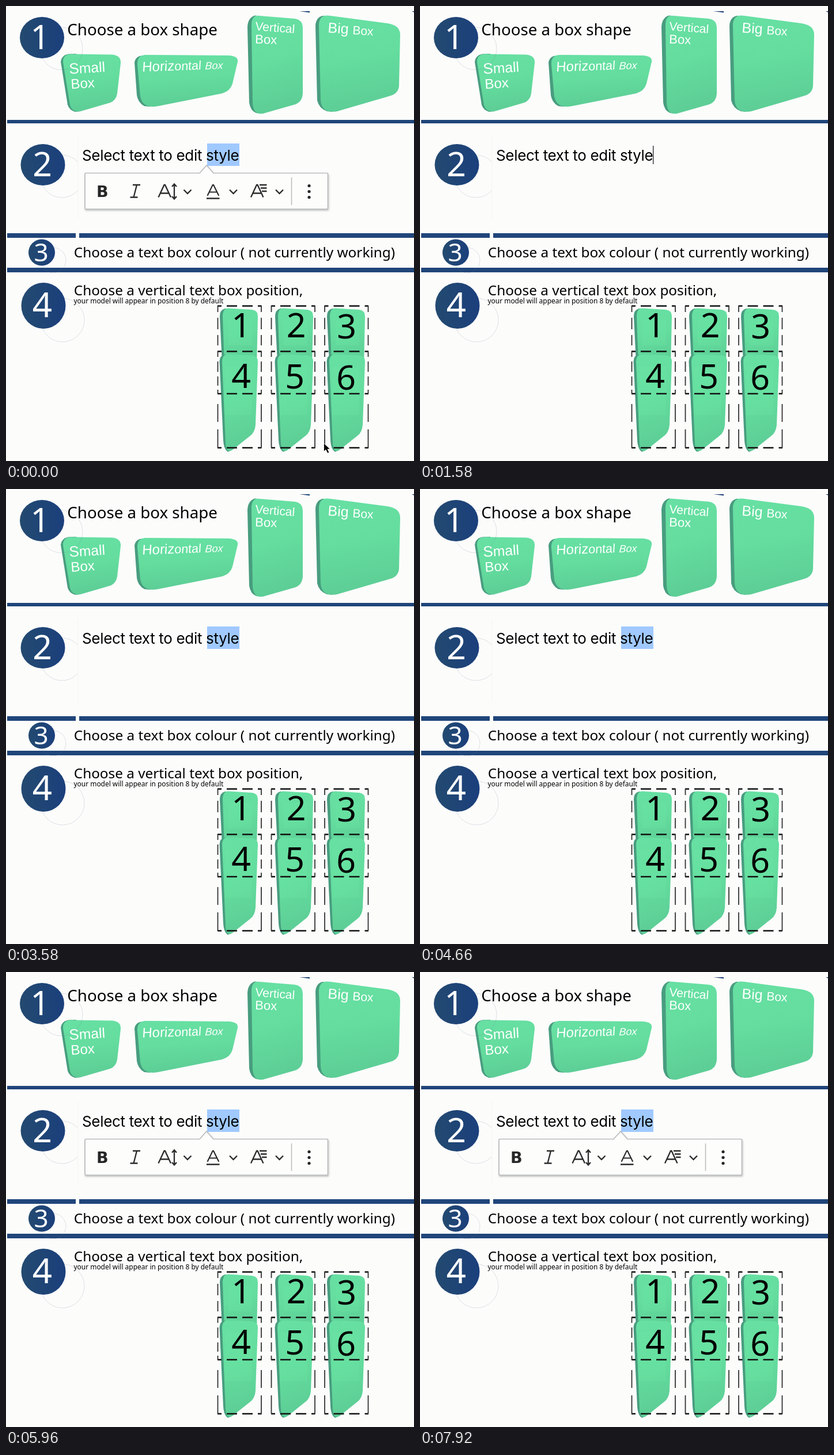
Animation of 708 by 791 pixels, one loop 8000 ms. Source, as an HTML page:

```html
<!DOCTYPE html>
<html lang="en">
<head>
<meta charset="utf-8">
<title>Choose a box</title>
<style>
  html, body { margin: 0; width: 100%; height: 100%; overflow: hidden; background: #fcfcfb; }
  svg { display: block; width: 100vw; height: 100vh; }
  text { font-family: "Noto Sans", sans-serif; }
  .label text { font-family: "Liberation Sans", Arial, sans-serif; fill: #fff; }
  .sample { font: 26px Inter, sans-serif; letter-spacing: -.33px; }
  .bold { font: 700 27px "DejaVu Sans", sans-serif; fill: #262626; }
  .digit { font-size: 59px; text-anchor: middle; }
  .ring { fill: none; stroke: #6f7a90; stroke-opacity: .28; stroke-width: .8; }
  .icon { fill: none; stroke: #2b2b2b; stroke-width: 2.3; }
</style>
</head>
<body>
<svg viewBox="0 0 708 791" preserveAspectRatio="none">
  <defs>
    <linearGradient id="green" x1="0" y1="0" x2=".15" y2="1">
      <stop offset="0" stop-color="#67e0a3"/>
      <stop offset=".5" stop-color="#64dd9e"/>
      <stop offset="1" stop-color="#5dce96"/>
    </linearGradient>
    <linearGradient id="navy">
      <stop offset="0" stop-color="#234a70"/>
      <stop offset="1" stop-color="#1b3f7c"/>
    </linearGradient>
    <filter id="shadow" x="-5%" y="-20%" width="110%" height="150%">
      <feDropShadow dx="1" dy="2" stdDeviation="1.5" flood-opacity=".25"/>
    </filter>
    <clipPath id="leftPart"><path d="M0 200H124V395H0z"/></clipPath>
    <path id="chevron" class="icon" d="M-6.500-3L0 3.500 6.500-3"/>
    <path id="letterA" class="icon" d="M0 21.500L10 0H11.500L21.500 21.500M4 14.500H17.500"/>
  </defs>

  <!-- dividers -->
  <path fill="#20457a" d="M2 198H708V204H2zM2 395H121V403H2zM127 395H708V403H127zM2 455H708V463H2zM509 9H527V11.500zM704 9H708V11z"/>
  <path stroke="#f4f4f0" d="M124.500 225V370"/>

  <!-- sample shapes -->
  <g fill="#489d7f">
    <path d="M95 97Q96 86 108 83.500L122 83 130 183 120 184Q110 181 107 172Z"/>
    <path d="M223 98Q224 90 232 87L245 85 250 175 240 174Q229 168 227 155Z"/>
    <path d="M419 36Q420 20 432 16.500L445 18 444 187 434 186Q424 182 422 168Z"/>
    <path d="M537 34Q538 20 549 17L566 18 566 184 557 183Q543 178 540 164Z"/>
  </g>
  <g fill="url(#green)">
    <path d="M99 98Q98 84 114 83.500L184 84.500Q200 86 199 99L193 152Q191 164 181 168L133 182Q115 187 111 172Z"/>
    <path d="M228 102Q227 86 242 85L386 86Q404 87 402 97L393 135Q389 148 375 152L264 174Q237 179 233 157Z"/>
    <path d="M426 37Q425 14 440 17L501 22Q515 24 515 38V152Q514 167 502 171L446 187Q429 190 428 168Z"/>
    <path d="M543 36Q542 13 563 17L661 30Q684 33 684 50L682 139Q681 153 664 157L575 183Q548 188 546 164Z"/>
  </g>
  <g class="label">
    <g transform="translate(110 118) rotate(-3.500)"><text font-size="26">S<tspan font-size="24.700">mall</tspan></text></g>
    <g transform="translate(113 144) rotate(-4)"><text font-size="24">Box</text></g>
    <g transform="translate(236 114) rotate(-2) skewX(-5)"><text font-size="24">Horiz<tspan font-size="21.500">ontal</tspan> <tspan font-size="18" font-style="italic">Box</tspan></text></g>
    <g transform="translate(432 42) rotate(4.500)"><text font-size="21">Vertical</text></g>
    <g transform="translate(432 65) rotate(2)"><text font-size="22">Box</text></g>
    <g transform="translate(558 46) rotate(4)"><text font-size="25">Big <tspan font-size="21">Box</tspan></text></g>
  </g>

  <g id="steps"></g>

  <!-- instructions -->
  <text x="106.300" y="51" font-size="27.700">Choose a box shape</text>
  <text x="117.800" y="437" font-size="24.370">Choose a text box colour ( not currently working)</text>
  <text x="117.800" y="503" font-size="24.300">Choose a vertical text box position,</text>
  <text x="117.500" y="517" font-size="11.950">your model will appear in position 8 by default</text>

  <!-- text editor -->
  <rect id="selection" y="239" height="39" fill="#a0c9ff"/>
  <text class="sample" x="132" y="269">Select text to edit style</text>
  <path id="caret" stroke="#222" stroke-width="1.300" d="M404.700 243V275"/>
  <g id="toolbar">
    <path filter="url(#shadow)" fill="#fdfdfb" stroke="#b9bbbd" stroke-width="1.700" d="M138 290.500H336L348 277 360 290.500H557Q558.500 290.500 558.500 292V351Q558.500 353 557 353H138.500Q137 353 137 351V292Q137 290.500 138 290.500Z"/>
    <text class="bold" x="157" y="332">B</text>
    <path class="icon" d="M220 311H233M215.500 332.500H228.500M227 311L221.500 332.500M292 310V335M288 314L292 309.500 296 314M288 331L292 335.500 296 331M348 334.500H370.500M440 311H452.500M442 316.500H452.500M444 322H452.500"/>
    <use href="#letterA" x="264.500" y="311"/>
    <use href="#letterA" transform="translate(349.500 311) scale(.92 .87)"/>
    <use href="#letterA" x="425" y="311"/>
    <use href="#chevron" x="315" y="322.500"/>
    <use href="#chevron" x="394.500" y="322.500"/>
    <use href="#chevron" x="474.500" y="322.500"/>
    <path stroke="#b9bbbd" stroke-width="1.500" d="M495.500 298V346"/>
    <g fill="#262626"><circle cx="526" cy="312.500" r="2.600"/><circle cx="526" cy="322.500" r="2.600"/><circle cx="526" cy="332.500" r="2.600"/></g>
  </g>

  <g id="positions"></g>
  <path id="pointer" fill="#000" stroke="#fff" stroke-width=".8" d="M551.500 760V774.500L555 771.500 558 777.500 560.800 776 558 770.500H562.500Z"/>
</svg>
<script>
const $ = id => document.getElementById(id);

// Numbered badges: digit, centre, radii, ring centre and radius, digit position and size
const badge = (n, cx, cy, rx, ry, ringX, ringY, ringR, x, y, size) => `
  <circle class="ring" cx="${ringX}" cy="${ringY}" r="${ringR}" ${n === 2 ? 'clip-path="url(#leftPart)"' : ''}/>
  <ellipse cx="${cx}" cy="${cy}" rx="${rx}" ry="${ry}" fill="url(#navy)"/>
  <text class="digit" x="${x}" y="${y}" style="font-size:${size}px" fill="#fff">${n}</text>`;

$('steps').innerHTML =
  badge(1, 62.5, 55, 38.5, 36, 96, 74, 37, 59, 75, 59) +
  badge(2, 64, 276, 38.5, 36, 97, 296, 37, 63, 296, 59) +
  badge(3, 62, 428.5, 23, 23, 82, 442, 22, 61, 444, 44) +
  badge(4, 65, 521, 38.5, 40, 98, 546, 38, 63, 541, 60);

const column = dx => `<g transform="translate(${dx} 0)">
  <path fill="#489d7f" d="M371 540Q371 528 380 526H390V620H375Z"/>
  <path fill="url(#green)" d="M376 540Q376 525 386 525.500L427 528Q437 529 437 540L435 625H379Z"/>
  <path fill="#489d7f" d="M370.500 618Q371 607 380 606H390V773L385 775Q378 771 377 755Z"/>
  <path fill="url(#green)" d="M375 619Q375 605 386 605.500L426 607Q437 608 437 618L433 728Q432 741 424 747L394 771Q382 780 381 760Z"/>
  <path fill="#6be8a2" opacity=".25" d="M386 545H427V590H386zM380 627H427V711H380z"/>
</g>`;

// Dashed outlines of the three stacked cells in a column
const frame = x => {
  const across = y => `M${x} ${y}h7m9 0h18m9 0h18m9 0h6.500`;
  const down = side => `M${side} 521v11m0 10v20m0 10v18M${side} 600v10m0 8v18m0 8v16m0 7v7M${side} 692v31m0 13v32`;
  return `<path fill="none" stroke="#111" stroke-width="2.600" d="${[521.5, 600.5, 674, 768].map(across).join('')}"/>
    <path fill="none" stroke="#333" stroke-width="1.800" d="${down(x + .5)}${down(x + 76)}"/>`;
};

const digits = [[408, 576], [503.5, 576], [591, 578], [408, 664], [501, 665], [590, 667]];
$('positions').innerHTML =
  [0, 96, 186].map(column).join('') +
  [367, 460, 552.5].map(frame).join('') +
  digits.map(([x, y], i) => `<text class="digit" x="${x}" y="${y}">${i + 1}</text>`).join('');

// Left edge of the selection while it is dragged back over "style"
const drag = [[2660, 391], [2860, 385], [2980, 371], [3100, 363], [3220, 349]];
const END = 405;

function selectionStart(t) {
  if (t < 1090) return 349;
  return drag.reduce((x, [at, left]) => t >= at ? left : x, END);
}

const show = (id, on) => $(id).setAttribute('visibility', on ? 'visible' : 'hidden');

function draw() {
  const t = performance.now() % 8000;
  const left = selectionStart(t);
  $('selection').setAttribute('x', left);
  $('selection').setAttribute('width', END - left);
  show('caret', left === END);
  show('toolbar', t < 1090 || t >= 5320);
  show('pointer', t < 200);
  requestAnimationFrame(draw);
}
draw();
</script>
</body>
</html>
```
